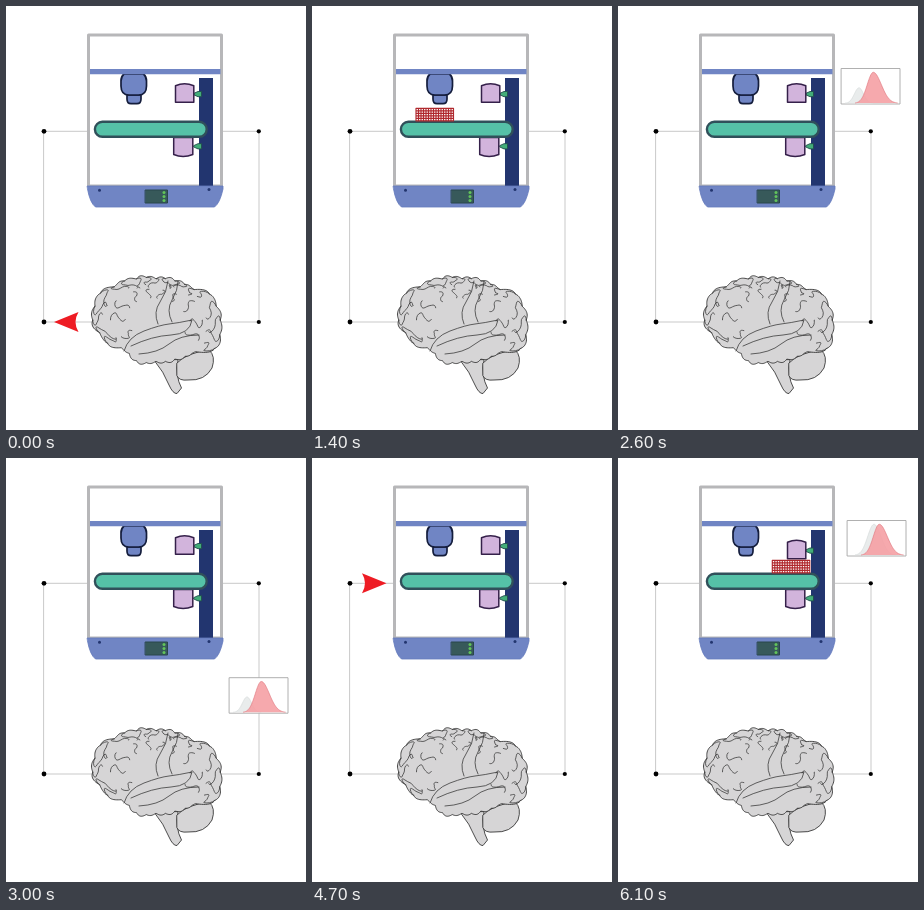
Recreate the animation shown at these times as an HTML page with a canvas. Size 300x424 px, loop 7.1 s.

```html
<!DOCTYPE html>
<html lang="en">
<head>
<meta charset="utf-8">
<title>Print, scan and learn loop</title>
<style>
html, body { margin: 0; width: 100%; height: 100%; overflow: hidden; background: #fff; }
canvas { display: block; width: 300px; height: 424px; }
</style>
</head>
<body>
<canvas id="stage"></canvas>
<script>
const W = 300, H = 424, LOOP = 7100, STEP = 200, ROUND = 3900, TAU = Math.PI * 2;
const canvas = document.getElementById('stage');
const ctx = canvas.getContext('2d');
const ratio = window.devicePixelRatio || 1;
canvas.width = W * ratio;
canvas.height = H * ratio;
ctx.scale(ratio, ratio);
ctx.lineJoin = ctx.lineCap = 'round';

const BLUE = '#7085c4', NAVY = '#22356f', INK = '#141d3c', LILAC = '#d2b4dc', GREY = '#d6d5d6';
const clamp = v => Math.max(0, Math.min(1, v));

function paint(path, fill, stroke, width = 1) {
  if (fill) { ctx.fillStyle = fill; ctx.fill(path); }
  if (stroke) { ctx.strokeStyle = stroke; ctx.lineWidth = width; ctx.stroke(path); }
}

function shape(d, fill, stroke, width) {
  paint(new Path2D(d), fill, stroke, width);
}

function box(x, y, w, h, fill, stroke, width, radius = 0) {
  const p = new Path2D();
  p.roundRect(x, y, w, h, radius);
  paint(p, fill, stroke, width);
}

function dot(x, y, r, fill) {
  const p = new Path2D();
  p.arc(x, y, r, 0, TAU);
  paint(p, fill);
}

// Path through count + 1 points of a function of 0..1.
function trace(point, count) {
  const p = new Path2D();
  for (let i = 0; i <= count; i++) p.lineTo(...point(i / count));
  return p;
}

function seeded(seed) {
  return () => (seed = (seed * 16807) % 2147483647) / 2147483647;
}

// The cerebrum is a scalloped polar shape; a depth of 1 is its edge.
const RADII = [65, 67, 48, 44, 42, 46, 43, 55, 64, 63, 52, 46, 42, 44, 47, 61];
const LOBES = 14;

function onBrain(angle, depth) {
  const u = ((angle / TAU + 1) % 1) * RADII.length;
  const i = Math.floor(u), mix = (1 - Math.cos((u - i) * Math.PI)) / 2;
  const edge = RADII[i] + (RADII[(i + 1) % RADII.length] - RADII[i]) * mix;
  const r = depth * (edge - 0.8 + 1.8 * Math.abs(Math.sin(LOBES * angle)));
  return [150 + r * Math.cos(angle), 314 + r * Math.sin(angle)];
}

const cerebrum = trace(t => onBrain(t * TAU, 1), 336);

// Curls run inward from the notches, except across the temporal lobe.
function makeFolds() {
  const random = seeded(41), folds = [];
  for (let k = 0; k < LOBES * 2; k++) {
    const angle = k * Math.PI / LOBES;
    if (angle > 0.5 && angle < 2.5) continue;
    for (const [from, to] of [[1, 0.76], [0.72, 0.46]]) {
      const swing = (random() < 0.5 ? -1 : 1) * (0.08 + 0.06 * random());
      const drift = (random() - 0.5) * 0.3, end = to + 0.08 * random();
      if (from < 1 && k % 2) continue;
      folds.push(trace(t => onBrain(
        angle + drift * t + swing * Math.sin(t * 5.5), from + (end - from) * t), 16));
    }
  }
  return folds;
}

const folds = makeFolds();
const sulci = new Path2D(
  'M118 345Q122 331 138 325T163 318T186 314Q184 328 165 329T125 340' +
  'M133 348Q152 347 163 338T193 329' +
  'M152 318Q147 306 154 296T162 275' +
  'M166 316Q160 304 166 294T172 276');

function brain() {
  shape('M148 354Q158 366 163 379Q167 388 171 387.5L175.5 382Q169 370 172 354Z', GREY, '#222', 0.8);
  shape('M171 357Q180 347 203 344Q210 350 206 362Q199 375 182 374Q173 375 171 370Z', GREY, '#222', 0.8);
  paint(cerebrum, GREY, '#222', 0.8);
  for (const fold of folds) paint(fold, null, '#333', 0.75);
  paint(sulci, null, '#333', 0.75);
}

function circuit() {
  box(38, 125.3, 215, 190.7, null, '#c9c9c9', 1);
  for (const y of [125.3, 316]) {
    dot(38, y, 2.4, '#000');
    dot(252.8, y, 2.1, '#000');
  }
}

function printer() {
  box(82.5, 29, 133, 151, '#fff', '#b7b7b9', 3);
  box(193, 72, 14, 108, NAVY);
  shape('M81.5 180H217V183Q214 197 208.5 201H89.5Q84 197 81.5 183Z', BLUE, '#6379bb', 0.8);
  dot(93.5, 184.2, 1.5, NAVY);
  dot(203, 183.6, 1.5, NAVY);
  box(139.5, 184, 22, 13, '#37595a', '#29464b', 1);
  for (let i = 0; i < 3; i++) dot(158, 186.5 + i * 4, 1.5, '#62c45a');
  shape('M121 89H135V93Q135 97.7 131 97.7H125Q121 97.7 121 93Z', BLUE, INK, 1.7);
  shape('M118 68Q115 70.5 115 75V80Q115 89 123 89H132.5Q140.5 89 140.5 80V75Q140.5 70.5 137.5 68Z', BLUE, INK, 1.7);
  box(84, 63, 130.5, 5.2, BLUE);
}

function plug(y) {
  shape(`M188 ${y - 0.8}L192 ${y - 2.6}H195.5V${y + 2.6}H192L188 ${y + 0.8}Z`, '#43ad79', '#214f4d', 0.9);
}

function lamps(drop, lit) {
  const y = 78.3 + drop;
  plug(y + 9.8);
  plug(140.3);
  shape(`M169.5 ${y + 1.5}Q178.5 ${y - 2.5} 187.8 ${y + 1.5}V${y + 18}H169.5Z`, LILAC, '#35204a', 1.5);
  shape('M167.7 131.5H186.8V148.5Q177 152.5 167.7 148.5Z', lit ? '#f4ec2d' : LILAC, '#35204a', 1.5);
}

function platform() {
  box(88.9, 115.8, 111.8, 15, '#55c1a7', '#30505a', 2.4, 7.5);
}

function lattice(x, part) {
  const pitch = 2.5, w = 37.5, h = 12.5 * part, top = 114.8 - h;
  box(x, top, w, h, '#fff');
  const p = new Path2D();
  for (let d = 0; d <= w; d += pitch) { p.moveTo(x + d, top); p.lineTo(x + d, top + h); }
  for (let d = 0; d <= h; d += pitch) { p.moveTo(x, top + h - d); p.lineTo(x + w, top + h - d); }
  paint(p, null, '#b0282d', 1.15);
}

function arrow(x, y, turn) {
  ctx.save();
  ctx.translate(x, y);
  ctx.rotate(turn);
  shape('M-12.5 0L12 -10Q6 0 12 10Z', '#ee1c24');
  ctx.restore();
}

function bell(mid, base, height, left, right, fill, stroke) {
  const span = 3 * (left + right);
  const p = trace(t => {
    const d = t * span - 3 * left, s = d < 0 ? left : right;
    return [mid + d, base - height * Math.exp(-d * d / (2 * s * s))];
  }, 90);
  paint(p, fill, stroke, 0.7);
}

function chart(x, y, second) {
  box(x + 0.5, y + 0.5, 58.5, 35.5, '#fff', '#a8a8a8', 0.9);
  const base = y + 35.3;
  if (second) bell(x + 27, base, 31, 6.3, 7, '#e9ecec', '#d6dada');
  else bell(x + 18, base, 15.5, 4.6, 4.6, '#e9ecec', '#d6dada');
  ctx.globalAlpha = 0.9;
  bell(x + 32.3, base, 31, 6, 8, '#f5a0a5', '#e0757d');
  ctx.globalAlpha = 1;
}

// From the brain, up the left side and into the printer.
function moveArrow(k) {
  if (k === 0) arrow(60.5, 316, 0);
  else if (k < 4) arrow(38, 361 - 71 * k, Math.PI / 2);
  else if (k === 4) arrow(62, 125.3, Math.PI);
}

// From the scanner, down the right side and into the brain.
function moveChart(k, second) {
  if (k < 11) return;
  if (k < 13) chart(229, 62, second);
  else if (k < 17) chart(223, 62 + 78.6 * (k - 13), second);
  else chart(188, 298, second);
}

function draw(t) {
  const second = t >= ROUND;
  const k = Math.min(17, Math.floor((t % ROUND) / STEP));
  const scanning = k >= 9 && k < 12;
  ctx.clearRect(0, 0, W, H);
  circuit();
  printer();
  lamps(scanning ? 4.5 : 0, k === 10);
  platform();
  if (k >= 5 && k < 12) lattice(104 + 50.3 * clamp((k - 7) / 2), clamp((k - 4) / 3));
  brain();
  moveArrow(k);
  moveChart(k, second);
}

const start = performance.now();
function tick() {
  draw((performance.now() - start) % LOOP);
  requestAnimationFrame(tick);
}
tick();
</script>
</body>
</html>
```
